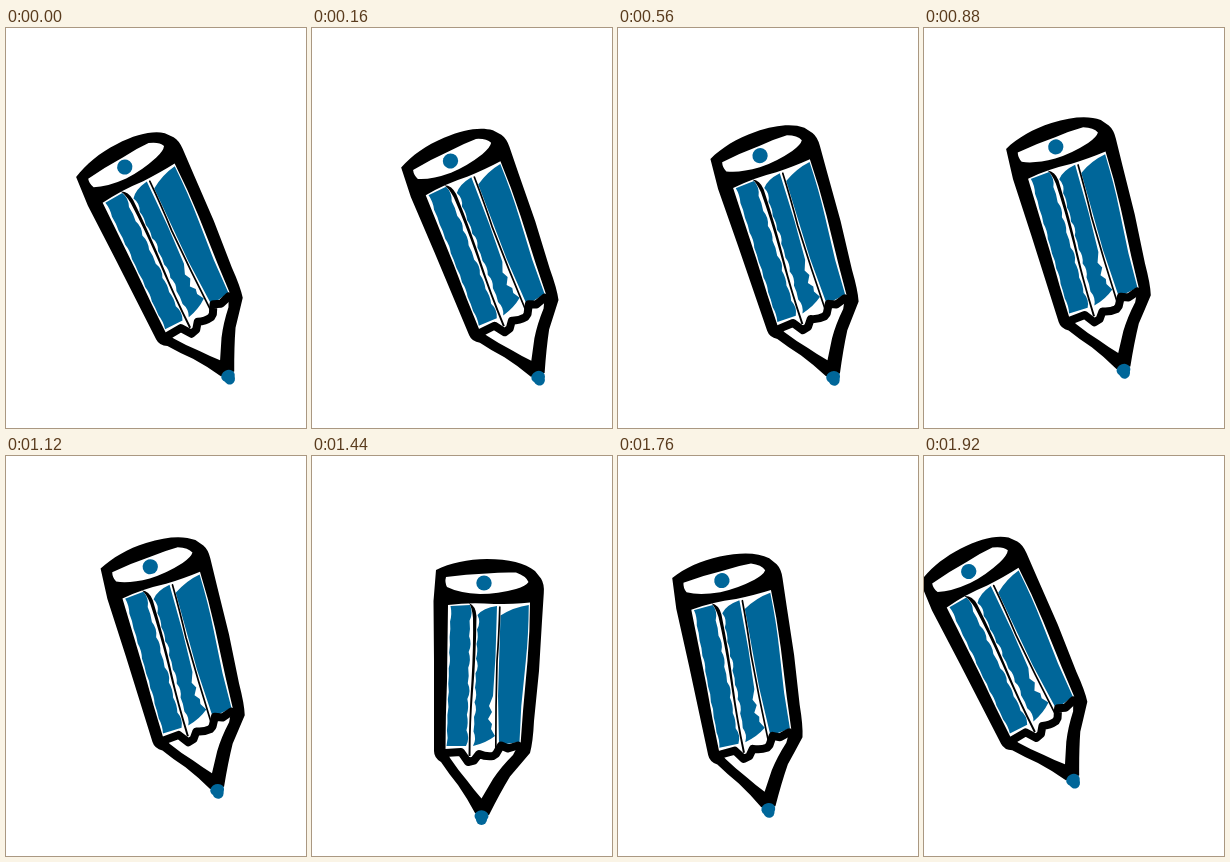
An HTML page with a canvas that plays this animation: 300 px wide and 400 px high, repeating every 2 s.

```html
<!DOCTYPE html>
<html lang="en">
<head>
<meta charset="utf-8">
<title>Pencil</title>
<style>
html, body { margin: 0; width: 100%; height: 100%; overflow: hidden; background: #fff; }
canvas { display: block; width: 300px; height: 400px; }
</style>
</head>
<body>
<canvas id="stage" width="300" height="400"></canvas>
<script>
const ctx = document.getElementById('stage').getContext('2d');
const BLUE = '#006699';
const LOOP = 2000, STEP = 80;
const TIP = [169, 361];

// time, tip x, tip y, angle in degrees
const poses = [
  [0, 222, 349, -26.9],
  [160, 226, 350, -22.7],
  [320, 235, 350.5, -20.3],
  [560, 215, 350, -18.9],
  [800, 198, 345, -17.6],
  [1120, 211, 335, -17.3],
  [1200, 208, 327, -15.3],
  [1280, 196, 329, -10],
  [1440, 169, 361, 0],
  [1520, 158, 375, 0.8],
  [1600, 149, 374, -0.4],
  [1680, 142, 365, -3.6],
  [1760, 150, 354, -12.1],
  [1920, 149, 325, -27.2]
];

function poseAt(t) {
  let i = 0;
  while (i < poses.length - 2 && t >= poses[i + 1][0]) i++;
  const a = poses[i], b = poses[i + 1];
  const before = poses[i - 1] || a, after = poses[i + 2] || b;
  const span = b[0] - a[0];
  const u = Math.min(1, (t - a[0]) / span);
  const u2 = u * u, u3 = u2 * u;
  return [1, 2, 3].map(k => {
    const m0 = (b[k] - before[k]) / (b[0] - before[0]) * span;
    const m1 = (after[k] - a[k]) / (after[0] - a[0]) * span;
    return (2 * u3 - 3 * u2 + 1) * a[k] + (u3 - 2 * u2 + u) * m0
         + (3 * u2 - 2 * u3) * b[k] + (u3 - u2) * m1;
  });
}

function fill(path, color) {
  ctx.fillStyle = color;
  ctx.fill(path instanceof Path2D ? path : new Path2D(path));
}

function stroke(d, width) {
  ctx.lineWidth = width;
  ctx.stroke(new Path2D(d));
}

function disc(x, y, rx, ry) {
  const p = new Path2D();
  p.ellipse(x, y, rx, ry, 0, 0, Math.PI * 2);
  fill(p, BLUE);
}

// Uneven scalloped edge between two points
function scallop(p, x0, y0, x1, y1, n, amp) {
  for (let i = 1; i <= n; i++) {
    const u = i / n, m = (i - 0.5) / n;
    const bulge = amp * (0.65 + 0.35 * Math.sin(i * 2.3));
    p.quadraticCurveTo(x0 + (x1 - x0) * m + bulge, y0 + (y1 - y0) * m,
                       x0 + (x1 - x0) * u, y0 + (y1 - y0) * u);
  }
}

const leftStripe = new Path2D('M139 150 L158 149');
scallop(leftStripe, 158, 149, 154, 290, 9, 4);
leftStripe.lineTo(134.5, 290);
scallop(leftStripe, 134.5, 290, 138.5, 150, 9, 2);
leftStripe.closePath();

const midStripe = new Path2D(
  'M165.5 159 Q171 152 185 150 L183.5 200 L181 240 L177 250 L180 256 L176 263 L180 268 L179 273 L183 280 Q174 287 161 290');
scallop(midStripe, 161, 290, 165.5, 159, 9, 4);
midStripe.closePath();

const WOOD_EDGE = 'L149 296 L156 306 L162 304.5 L167 298 Q174 301 181 300 L184 298 L189 289.5 L196 292.5 L206 289.5';

function drawPencil() {
  ctx.lineJoin = ctx.lineCap = 'round';

  fill('M124 114 C138 107 156 103 175 103 C197 103 213 107 223 115 L229 122.5 Q232.5 128 231.8 137 '
     + 'L230 165 L227 215 L222 265 Q221 286 218 297 Q207 310 198 320.5 Q188 337 177 359 '
     + 'L163 357 Q155 342 146 329 Q137 318 129 306 Q122 302 122 295 L122 205 L121.5 145 Z', '#000');
  fill('M134 121 Q154 118 175 117.5 Q190 116 204 116.5 Q214 120 216.5 126 Q214 130 204 133 '
     + 'Q186 138 168 138 Q147 137 135 131 Q132.5 126 134 121 Z', '#fff');
  fill('M133.5 296 Q133.5 260 135 225 L136 149 Q158 146 182 148 Q202 148 218 146.5 '
     + 'Q218 175 215.5 205 L211 255 L208.5 289 L206 289.5 L196 292.5 L189 289.5 L181 300 '
     + 'L167 298 L162 304.5 L156 306 L149 296 Z', '#fff');
  fill('M136 298 ' + WOOD_EDGE + ' L201 299 Q189 311 181 323 L169.5 342.5 Q162 334 155 324.5 Q146 314 138 302 Z', '#fff');

  fill(leftStripe, BLUE);
  fill(midStripe, BLUE);
  fill('M188.5 159.5 Q202 151 216.8 149 Q216.5 180 213.8 205 L209.3 250 L207.5 286 '
     + 'L187 289 L186 240 Z', BLUE);
  stroke('M133 297 ' + WOOD_EDGE, 8);

  // Facet lines
  fill('M157 147 Q164 150 164.5 160 Q164 200 161 235 Q158.5 265 158.5 300 L156.5 300 '
     + 'Q157 260 159.5 225 Q161.5 190 161 162 Q160 151 157 147 Z', '#000');
  stroke('M187.8 151 Q187 180 185 205 Q183.7 250 183.8 294', 1.7);

  disc(172, 127, 7.7, 7.5);
  disc(169.5, 360, 7, 5.8);
  disc(169.5, 363, 5.6, 6);
}

function frame(now) {
  const t = Math.floor(now % LOOP / STEP) * STEP;
  const [x, y, deg] = poseAt(t);
  ctx.setTransform(1, 0, 0, 1, 0, 0);
  ctx.fillStyle = '#fff';
  ctx.fillRect(0, 0, 300, 400);
  ctx.translate(x, y);
  ctx.rotate(deg * Math.PI / 180);
  ctx.translate(-TIP[0], -TIP[1]);
  drawPencil();
}

const start = performance.now();
function tick() {
  frame(performance.now() - start);
  requestAnimationFrame(tick);
}
tick();
</script>
</body>
</html>
```
